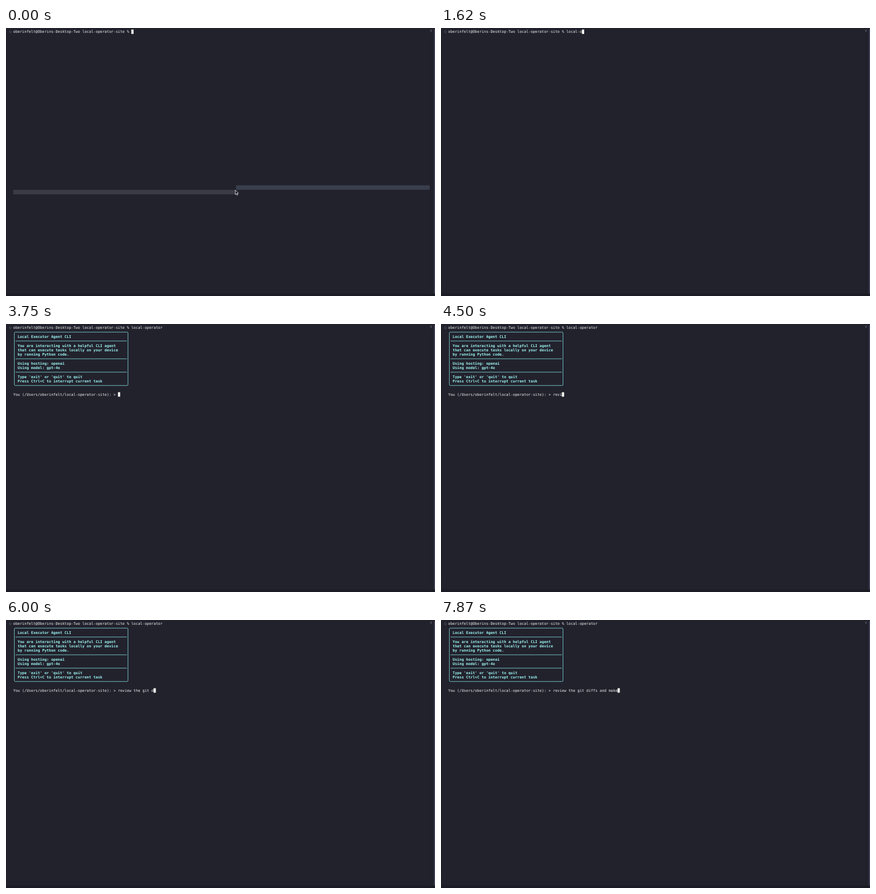
Recreate the animation shown at these times as an HTML page with a canvas. Size 800 by 500 pixels, loop 8000 ms.

```html
<!DOCTYPE html>
<html lang="en">
<head>
<meta charset="utf-8">
<title>Terminal session</title>
<style>
  html, body { margin: 0; width: 100%; height: 100%; overflow: hidden; background: #22222d; }
  canvas { display: block; }
</style>
</head>
<body>
<canvas id="stage" width="800" height="500"></canvas>
<script>
const ctx = document.getElementById('stage').getContext('2d');
const LOOP = 8000, TICK = 125;
const LEFT = 13.5, TOP = 2.8, CELL = 4.155, ROW = 8.3;
const WHITE = '#f4f4f2', CYAN = '#9cf6f2', BORDER = '#7fd9d8';

const PROMPT = 'oberinfelt@Oberins-Desktop-Two local-operator-site % ';
const COMMAND = 'local-operator';
const INPUT_PROMPT = 'You (/Users/oberinfelt/local-operator-site): > ';
const INPUT = 'review the git diffs and make';

// Ticks at which each character is typed
const COMMAND_KEYS = [4, 6, 7, 8, 9, 10, 13, 14, 14, 15, 16, 16, 17, 18];
const INPUT_KEYS = [33, 34, 35, 36, 37, 38, 39, 39, 40, 41, 43,
  ...Array.from({ length: 16 }, (_, i) => 44 + i), 61, 63];
const ENTER = 19, READY = 30;

const PANEL = {
  2: 'Local Executor Agent CLI',
  4: 'You are interacting with a helpful CLI agent',
  5: 'that can execute tasks locally on your device',
  6: 'by running Python code.',
  8: 'Using hosting: openai',
  9: 'Using model: gpt-4o',
  11: "Type 'exit' or 'quit' to quit",
  12: 'Press Ctrl+C to interrupt current task',
};

const colX = col => LEFT + col * CELL;
const rowY = row => TOP + row * ROW;

function rect(x, y, w, h, color) {
  ctx.fillStyle = color;
  ctx.fillRect(x, y, w, h);
}

function write(text, col, row, color = WHITE, weight = 'normal') {
  ctx.font = `${weight} 6.9px "DejaVu Sans Mono", monospace`;
  ctx.textRendering = 'geometricPrecision';
  ctx.fillStyle = color;
  [...text].forEach((ch, i) => ctx.fillText(ch, colX(col + i), rowY(row) + 6.5));
}

function caret(col, row) {
  rect(colX(col), rowY(row), CELL, ROW, '#f8f8f4');
}

function typed(text, keys, tick) {
  return text.slice(0, keys.filter(k => k <= tick).length);
}

function drawWindow() {
  rect(0, 0, 800, 500, '#22222d');
  rect(0, 12, 1, 464, '#1a1a23');
  rect(791, 0, 1, 496, '#1f1f29');
  rect(798, 2, 2, 494, '#403f58');
  rect(0, 495.5, 800, 4.5, '#1b1b24');
  rect(791.5, 3, 2, 4, '#555560');
  ctx.strokeStyle = '#60606b';
  ctx.lineWidth = 0.7;
  ctx.beginPath();
  ctx.arc(8.2, 7.1, 1.9, 0, 2 * Math.PI);
  ctx.stroke();
}

function drawPanel() {
  const middle = row => rowY(row) + ROW / 2 - 0.1;
  const left = colX(0.5), right = colX(51.5);
  ctx.strokeStyle = BORDER;
  ctx.lineWidth = 0.9;
  ctx.beginPath();
  ctx.roundRect(left, middle(1), right - left, middle(13) - middle(1), 1.8);
  for (const row of [3, 7, 10]) {
    ctx.moveTo(colX(1), middle(row));
    ctx.lineTo(colX(51), middle(row));
  }
  ctx.stroke();
  for (const row in PANEL) write(PANEL[row], 2, +row, CYAN, 'bold');
}

function drawPointer(x, y) {
  ctx.save();
  ctx.translate(x, y);
  ctx.beginPath();
  ctx.moveTo(0, 0);
  for (const [px, py] of [[0, 8.4], [1.9, 6.7], [3.2, 9.6], [4.5, 9], [3.2, 6.2], [5.8, 6]]) ctx.lineTo(px, py);
  ctx.closePath();
  ctx.fillStyle = '#111116';
  ctx.fill();
  ctx.strokeStyle = '#e8e8ec';
  ctx.lineWidth = 0.9;
  ctx.stroke();
  ctx.restore();
}

function draw(time) {
  const tick = Math.floor((time + 6) / TICK);
  drawWindow();
  if (tick < 1) {
    rect(429, 293.5, 361, 8.3, '#393f4c');
    rect(13.5, 302, 415, 8.3, '#3b3b48');
  }
  const command = typed(COMMAND, COMMAND_KEYS, tick);
  write(PROMPT + command, 0, 0);
  if (tick < ENTER) caret(PROMPT.length + command.length, 0);
  else if (tick < READY) caret(0, 1);
  else {
    const line = INPUT_PROMPT + typed(INPUT, INPUT_KEYS, tick);
    drawPanel();
    write(line, 0, 15);
    caret(line.length, 15);
  }
  if (tick < 3) drawPointer(427.6 + tick * 124, 302.3 + tick * 66);
}

function frame() {
  draw(performance.now() % LOOP);
  requestAnimationFrame(frame);
}
frame();
</script>
</body>
</html>
```
